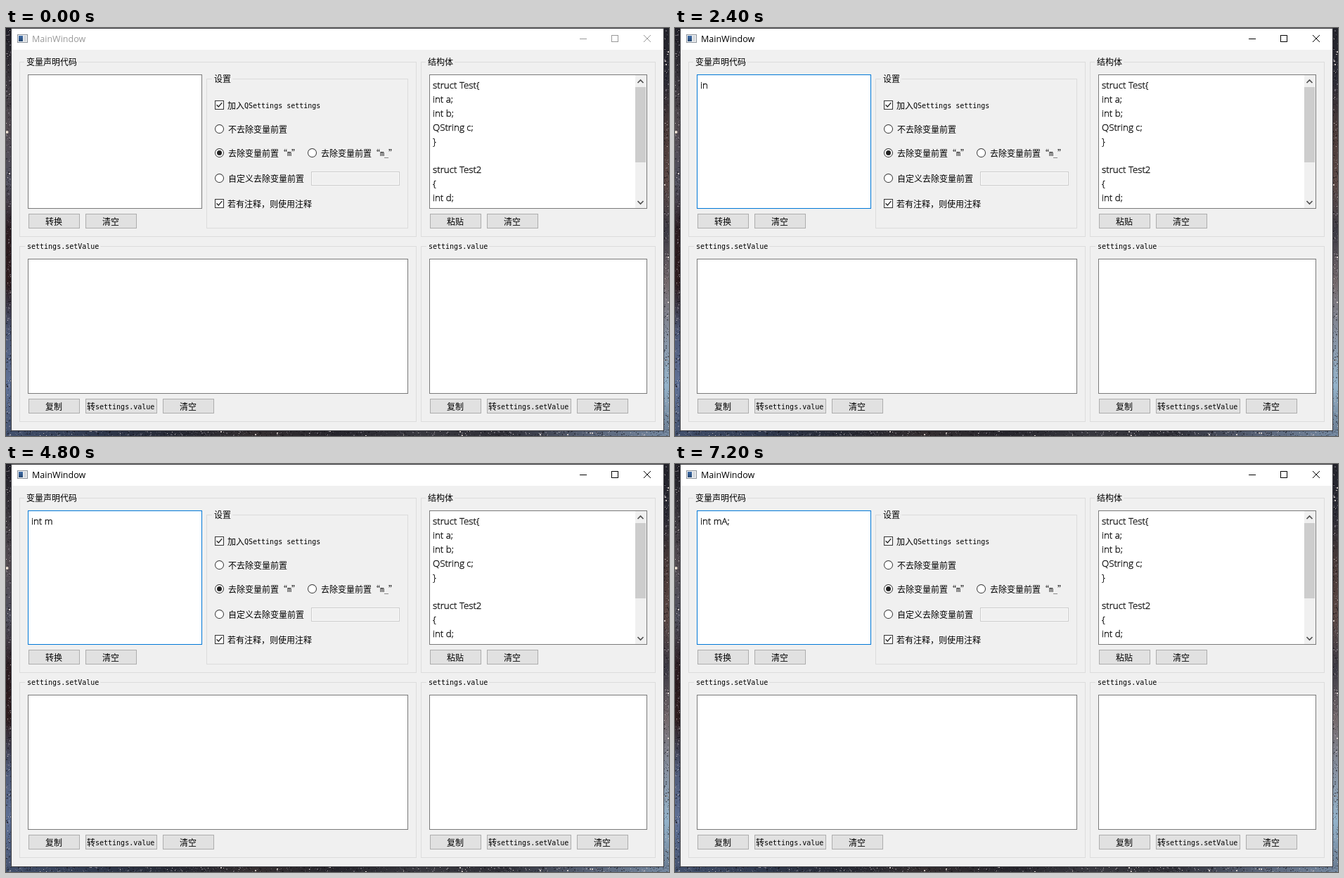
Animation, 943 px wide and 580 px high, one loop 8000 ms. Source, as an HTML page with a canvas:

```html
<!DOCTYPE html>
<html lang="zh-CN">
<head>
<meta charset="utf-8">
<title>MainWindow</title>
<style>
html, body { margin: 0; width: 100%; height: 100%; overflow: hidden; background: #1d1c24; }
canvas { display: block; }
</style>
</head>
<body>
<canvas id="stage" width="943" height="580"></canvas>
<script>
const W = 943, H = 580, STEP = 800, LOOP = 8000;
const ctx = document.getElementById('stage').getContext('2d');
const CJK = '12px "Noto Sans CJK SC", "Noto Sans CJK", sans-serif';
const MONO = '10px "DejaVu Sans Mono", monospace';
const TITLE = '12.5px "Open Sans", "Noto Sans", sans-serif';
const EDIT = '300 13.3px "Open Sans", "Noto Sans", sans-serif';
const TYPED = ['', '', '', 'in', 'int', 'int ', 'int m', 'int mA', 'int mA;', 'int mA;'];

function random(seed) {
  return () => (seed = (seed * 16807) % 2147483647) / 2147483647;
}

function fill(x, y, w, h, color) {
  ctx.fillStyle = color;
  ctx.fillRect(x, y, w, h);
}

// One-pixel frame; x2 and y2 are its last pixels.
function frame(x, y, x2, y2, line, inside) {
  if (inside) fill(x, y, x2 - x + 1, y2 - y + 1, inside);
  ctx.strokeStyle = line;
  ctx.lineWidth = 1;
  ctx.strokeRect(x + 0.5, y + 0.5, x2 - x, y2 - y);
}

function path(points, color, width = 1) {
  ctx.strokeStyle = color;
  ctx.lineWidth = width;
  ctx.beginPath();
  points.forEach(([x, y]) => ctx.lineTo(x, y));
  ctx.stroke();
}

function disc(x, y, r, color) {
  ctx.fillStyle = color;
  ctx.beginPath();
  ctx.arc(x, y, r, 0, Math.PI * 2);
  ctx.fill();
}

function text(str, x, y, font, color = '#000') {
  ctx.font = font;
  ctx.fillStyle = color;
  ctx.fillText(str, x, y);
}

// The light face needs a hairline outline to look crisp and dark.
function editText(str, x, y) {
  text(str, x, y, EDIT);
  ctx.strokeStyle = '#000';
  ctx.lineWidth = 0.3;
  ctx.strokeText(str, x, y);
}

// Splits a label into narrow and wide runs; wide glyphs sit a pixel lower.
const runs = str => str.match(/[\x20-\x7e]+|[^\x20-\x7e]+/g).map(part => {
  const latin = part.charCodeAt(0) < 127;
  const font = latin ? MONO : CJK;
  ctx.font = font;
  return { part, font, drop: latin ? 0 : 1, width: ctx.measureText(part).width };
});

const labelWidth = str => runs(str).reduce((sum, run) => sum + run.width, 0);

function label(str, x, y) {
  for (const { part, font, drop, width } of runs(str)) {
    text(part, x, y + drop, font);
    x += width;
  }
}

function group(title, x, y, x2, y2, tx) {
  frame(x, y, x2, y2, '#dcdcdc');
  fill(tx - 3, y, labelWidth(title) + 5, 1, '#f0f0f0');
  label(title, tx, y + 4);
}

function button(str, x, y, x2) {
  frame(x, y, x2, y + 20, '#adadad', '#e1e1e1');
  label(str, Math.round((x + x2 - labelWidth(str)) / 2), y + 15);
}

function checkbox(str, y) {
  frame(297, y - 7, 309, y + 5, '#333', '#fff');
  path([[299.5, y - 0.8], [302.3, y + 2], [307.3, y - 3.8]], '#222', 1.3);
  label(str, 315, y + 4);
}

function radio(str, x, y, on) {
  disc(x, y, 6.5, '#333');
  disc(x, y, 5.5, '#fff');
  if (on) disc(x, y, 3.5, '#222');
  label(str, x + 12.5, y + 4.5);
}

function gradient(x, y, w, h, colors) {
  const g = w > h ? ctx.createLinearGradient(x, 0, x + w, 0) : ctx.createLinearGradient(0, y, 0, y + h);
  colors.forEach((c, i) => g.addColorStop(i / (colors.length - 1), c));
  fill(x, y, w, h, g);
}

function starryStrip(x, y, w, h, colors, seed) {
  gradient(x, y, w, h, colors);
  const rnd = random(seed);
  const count = w * h / 9;
  for (let i = 0; i < count; i++) {
    const bright = rnd();
    const color = bright > 0.92 ? 'rgba(235,225,220,.8)'
      : bright > 0.55 ? 'rgba(175,170,180,.35)' : 'rgba(10,8,14,.4)';
    const size = rnd() > 0.8 ? 2 : 1;
    fill(x + Math.floor(rnd() * w), y + Math.floor(rnd() * h), size, size, color);
  }
}

function desktop() {
  starryStrip(0, 0, W, 2, ['#26262c', '#1c1c22', '#2c2a30'], 31);
  starryStrip(0, 0, 8, H, ['#1d1c24', '#3a363c', '#544c52', '#50505e', '#2c1c20', '#2e1c1e', '#4e5a78', '#5f7196', '#44526e'], 71);
  starryStrip(935, 0, 8, H, ['#22222a', '#2a2a34', '#4a3a38', '#5a4744', '#3c3a44', '#74696c', '#8690a0', '#93b2ca', '#66788e'], 113);
  starryStrip(0, 572, W, 8, ['#42506c', '#303a50', '#262934', '#342e30', '#26252c', '#38383f', '#2e2e36', '#566074', '#7488a0'], 173);
  disc(1.5, 148, 2, '#e8dccf');
}

function titleBar(active) {
  const ink = active ? '#000' : '#999';
  fill(8, 1, 927, 30, '#fff');
  frame(16, 9, 30, 20, '#8a9199', '#f4f6f8');
  gradient(18, 11, 6, 8, ['#3d6ca8', '#24456f']);
  fill(25, 11, 4, 8, '#d5d9dd');
  text('MainWindow', 37, 20, TITLE, ink);
  fill(816, 15, 10, 1, ink);
  frame(861, 10, 870, 19, ink);
  path([[907, 10], [917, 20]], ink);
  path([[917, 10], [907, 20]], ink);
}

function scrollBar() {
  fill(895, 67, 16, 189, '#f0f0f0');
  fill(895, 84, 15, 107, '#cdcdcd');
  path([[898.5, 78], [902.5, 74], [906.5, 78]], '#505050', 1.7);
  path([[898.5, 246], [902.5, 250], [906.5, 246]], '#505050', 1.7);
}

function draw(step) {
  const active = step > 0;
  desktop();
  frame(7, 0, 935, 572, '#3b3b40', '#f0f0f0');
  titleBar(active);

  group('变量声明代码', 19, 48, 583, 296, 29);
  group('设置', 285, 72, 571, 284, 296);
  group('结构体', 590, 48, 923, 296, 600);
  group('settings.setValue', 19, 310, 583, 559, 30);
  group('settings.value', 590, 310, 923, 559, 601);

  frame(31, 66, 278, 256, active ? '#0078d7' : '#7a7a7a', '#fff');
  frame(602, 66, 911, 256, '#7a7a7a', '#fff');
  frame(31, 328, 571, 519, '#7a7a7a', '#fff');
  frame(602, 328, 911, 519, '#7a7a7a', '#fff');
  scrollBar();

  checkbox('加入QSettings settings', 110);
  radio('不去除变量前置', 303.5, 143.5);
  radio('去除变量前置“m”', 303.5, 177.5, true);
  radio('去除变量前置“m_”', 435.5, 177.5);
  radio('自定义去除变量前置', 303.5, 213.5);
  checkbox('若有注释，则使用注释', 250);
  frame(434, 204, 559, 223, '#cccccc', '#f0f0f0');
  frame(435, 205, 558, 222, '#fafafa');

  button('转换', 32, 264, 104);
  button('清空', 113, 264, 185);
  button('粘贴', 603, 264, 675);
  button('清空', 684, 264, 756);
  button('复制', 32, 527, 104);
  button('转settings.value', 113, 527, 214);
  button('清空', 223, 527, 295);
  button('复制', 603, 527, 675);
  button('转settings.setValue', 684, 527, 803);
  button('清空', 812, 527, 884);

  ['struct Test{', 'int a;', 'int b;', 'QString c;', '}', '', 'struct Test2', '{', 'int d;']
    .forEach((line, i) => editText(line, 607, 86 + i * 20));
  editText(TYPED[step], 36, 86);
  if (step === 1) fill(36, 71, 1, 19, '#000');
}

let shown = -1;
function tick(now) {
  const step = Math.floor((now % LOOP) / STEP);
  if (step !== shown) draw(shown = step);
  requestAnimationFrame(tick);
}
draw(0);
requestAnimationFrame(tick);
</script>
</body>
</html>
```
